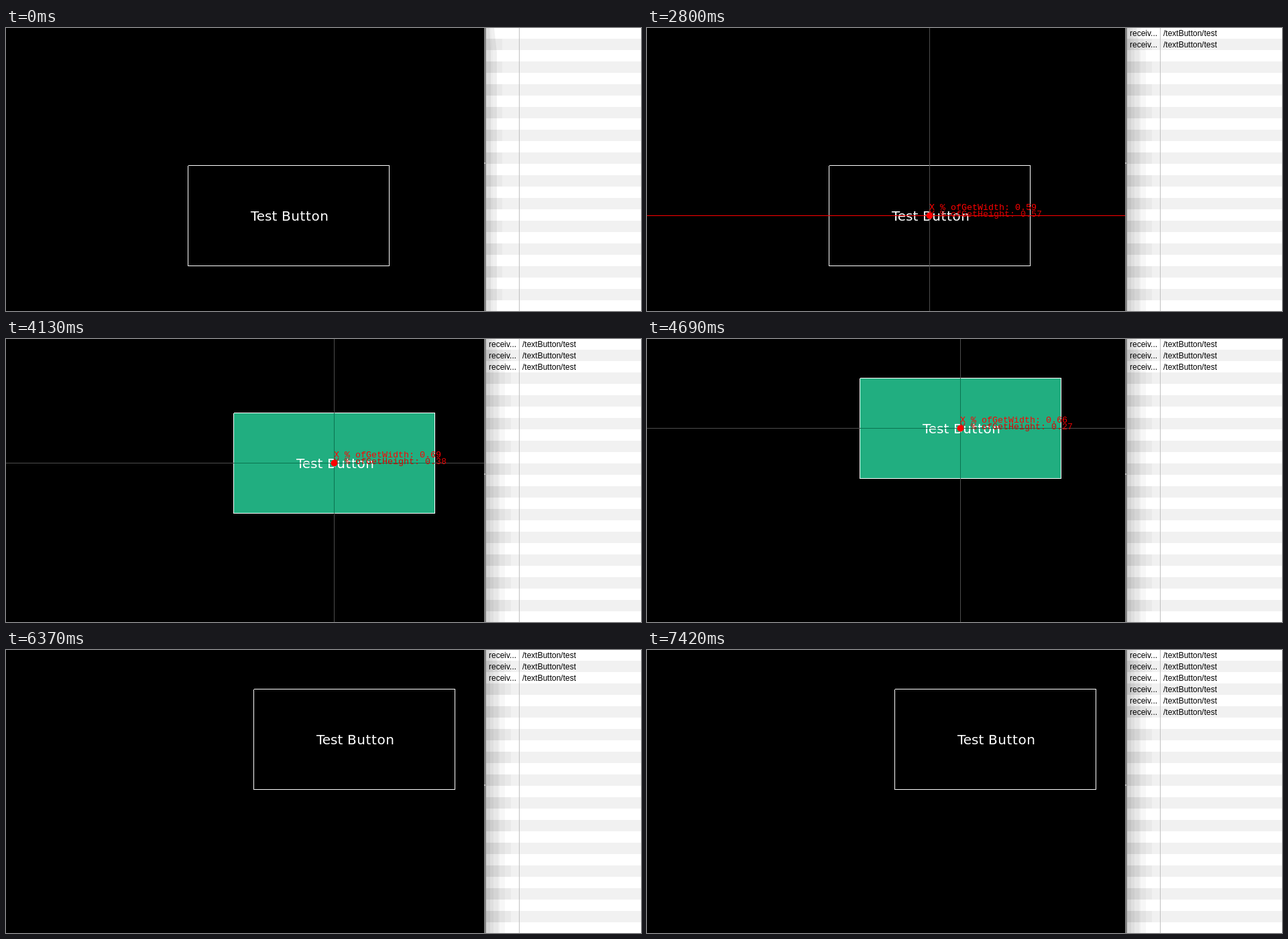
These frames come from a looping animation (947x423 px, 8540 ms). An HTML page with a canvas:

```html
<!DOCTYPE html>
<html lang="en">
<head>
<meta charset="utf-8">
<title>Test Button</title>
<style>
html, body { margin: 0; width: 100%; height: 100%; overflow: hidden; background: #000; }
canvas { display: block; }
</style>
</head>
<body>
<canvas id="stage" width="947" height="423"></canvas>
<script>
const ctx = document.getElementById('stage').getContext('2d');
const LOOP = 8540, TICK = 70;
const W = 947, H = 423, PANE = 713;
const BTN_W = 300, BTN_H = 150, GREEN = '#21ae80';

// [press, release]; each press logs one message
const presses = [[1890, 1960], [2100, 2240], [3570, 5600], [6930, 7000], [7140, 7210], [7350, 7420]];
const debugOn = 2800, debugOff = 6370;

// drag path of the button centre: time, x, y, velocity x, velocity y (per tick)
const path = [
  [3710, 421, 280, 6, -8],
  [4130, 489, 185, 5, -10],
  [5180, 438, 113, 1.4, -2.5],
  [5600, 519, 133, 6, 3]
];

function rect(color, x, y, w, h) {
  ctx.fillStyle = color;
  ctx.fillRect(x, y, w, h);
}

function text(str, x, y, font, color, spacing = 0) {
  ctx.font = font;
  ctx.fillStyle = color;
  ctx.letterSpacing = spacing + 'px';
  ctx.fillText(str, x, y);
}

function hermite(a, b, va, vb, n, u) {
  const u2 = u * u, u3 = u2 * u;
  return a * (2 * u3 - 3 * u2 + 1) + va * n * (u3 - 2 * u2 + u) +
         b * (3 * u2 - 2 * u3) + vb * n * (u3 - u2);
}

function centre(t) {
  const last = path[path.length - 1];
  if (t <= path[0][0]) return path[0].slice(1, 3);
  if (t >= last[0]) return last.slice(1, 3);
  const i = path.findIndex(p => p[0] > t);
  const a = path[i - 1], b = path[i];
  const n = (b[0] - a[0]) / TICK, u = (t - a[0]) / (b[0] - a[0]);
  return [1, 2].map(k => Math.round(hermite(a[k], b[k], a[k + 2], b[k + 2], n, u)));
}

function drawButton(cx, cy, down) {
  const x = cx - BTN_W / 2, y = cy - BTN_H / 2;
  if (down) rect(GREEN, x + 1, y + 1, BTN_W - 1, BTN_H - 1);
  rect('#fff', x + 1, y, BTN_W, 1);
  rect('#fff', x, y + 1, 1, BTN_H);
  rect('#fff', x + BTN_W, y, 1, BTN_H + 1);
  rect('#fff', x, y + BTN_H, BTN_W, 1);
  const font = '20px "DejaVu Sans", sans-serif';
  text('Test', cx - 56, cy + 8, font, '#fff');
  text('Button', cx - 10, cy + 8, font, '#fff', 0.6);
}

// Lines on odd pixels lose their colour, as in subsampled video
function drawGuides(cx, cy, down) {
  const vert = cx % 2 ? '#4c4c4c' : '#f00';
  const horiz = cy % 2 ? '#4c4c4c' : '#f00';
  rect(vert, cx, 0, 1, H);
  rect(horiz, 0, cy, PANE, 1);
  if (down) {
    if (cx % 2) rect('#0a7350', cx, cy - BTN_H / 2 + 1, 1, BTN_H - 1);
    if (cy % 2) rect('#0a7350', cx - BTN_W / 2 + 1, cy, BTN_W - 1, 1);
  }
  ctx.fillStyle = '#f00';
  ctx.beginPath();
  ctx.arc(cx + 0.5, cy + 0.5, 5, 0, Math.PI * 2);
  ctx.fill();
  const font = '13.333px "Liberation Mono", monospace';
  text('X % ofGetWidth: ' + (cx / 710).toFixed(2), cx, cy - 8, font, '#f00');
  text('Y % ofGetHeight: ' + (cy / 490).toFixed(2), cx, cy + 2, font, '#e00000');
}

// Banded window shadow, narrower near the top
function drawShadow(wide) {
  const bands = wide
    ? [[6, 0.05], [11, 0.04], [18, 0.03], [20, 0.03], [28, 0.03]]
    : [[7, 0.06], [10, 0.02], [16, 0.06]];
  for (const [w, alpha] of bands) {
    ctx.fillStyle = `rgba(0,0,0,${alpha})`;
    ctx.beginPath();
    ctx.moveTo(716, 0);
    ctx.lineTo(716 + w * 0.75, 0);
    ctx.lineTo(716 + w, 36);
    ctx.lineTo(716 + w, H);
    ctx.lineTo(716, H);
    ctx.fill();
  }
  for (let y = 16; y < H; y += 34) {
    rect('rgba(0,0,0,0.03)', 716, y, wide ? 37 : 24, 17);
  }
}

function drawList(rows, wide) {
  rect('#fff', PANE, 0, W - PANE, H);
  for (let y = 16; y < H; y += 34) rect('#f1f1f1', PANE, y, W - PANE, 17);
  drawShadow(wide);
  rect('#808080', PANE, 0, 3, H);
  rect('#c8c8c8', PANE, 201, 2, 2);
  rect('#c0c0c0', 765, 0, 1, H);
  const font = '12px "Liberation Sans", Arial, sans-serif';
  for (let i = 0; i < rows; i++) {
    text('receiv...', 720, 12 + i * 17, font, '#000');
    text('/textButton/test', 770, 12 + i * 17, font, '#000');
  }
}

function draw(now) {
  const t = Math.floor((now % LOOP) / TICK) * TICK;
  const down = presses.some(([a, b]) => t >= a && t < b);
  const rows = presses.filter(p => t >= p[0]).length;
  const [cx, cy] = centre(t);
  rect('#000', 0, 0, W, H);
  drawButton(cx, cy, down);
  if (t >= debugOn && t < debugOff) drawGuides(cx, cy, down);
  drawList(rows, t >= 770);
}

function loop() {
  draw(performance.now());
  requestAnimationFrame(loop);
}
loop();
</script>
</body>
</html>
```
